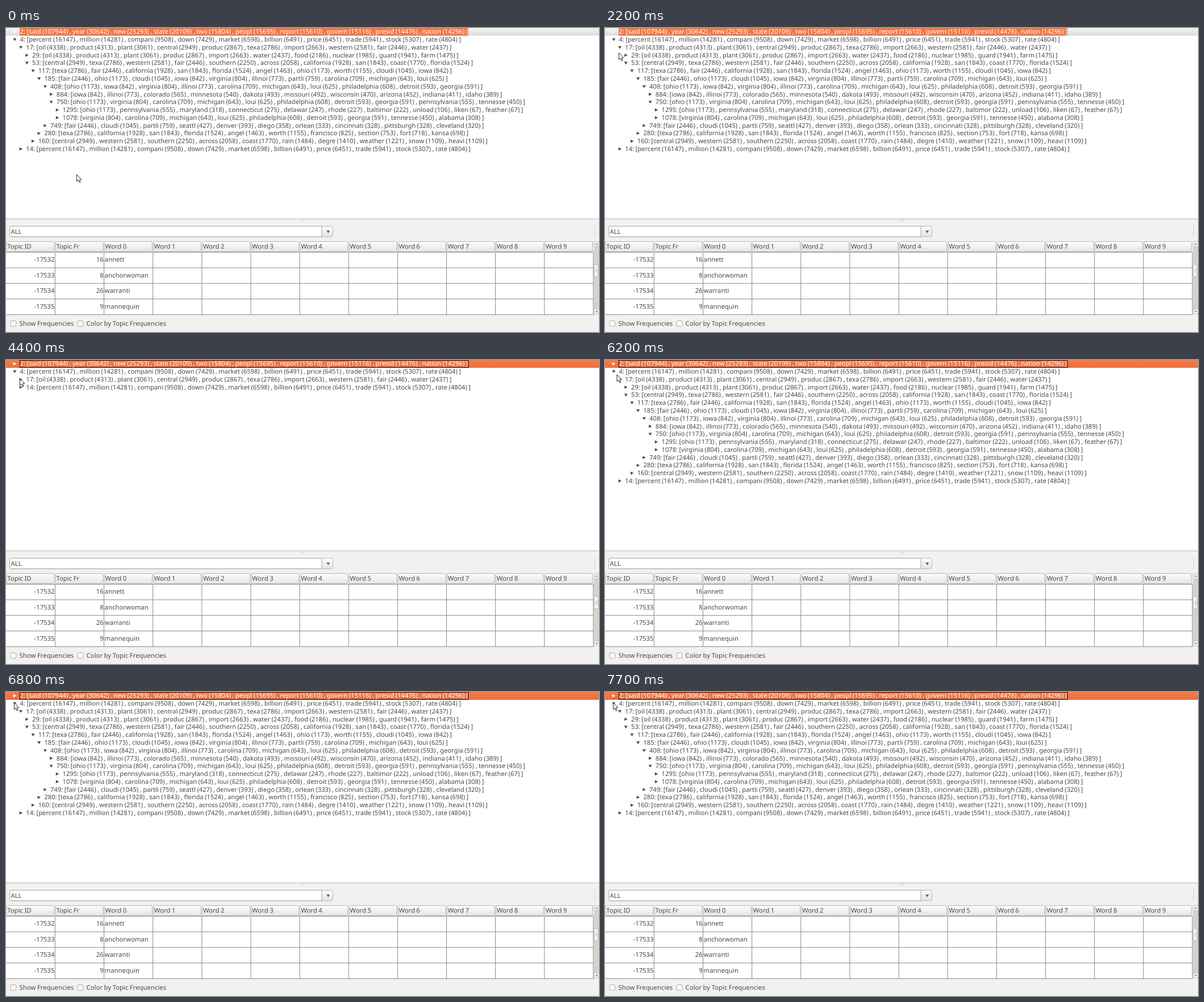
These frames come from a looping animation (1044 by 536 pixels, 8000 ms). An HTML page:

```html
<!DOCTYPE html>
<html lang="en">
<head>
<meta charset="utf-8">
<title>Topic tree</title>
<style>
  html, body { margin: 0; width: 100%; height: 100%; overflow: hidden; background: #f2f1f0; }
  svg { display: block; width: 100%; height: 100%; }
  text { font-family: "Noto Sans", "Open Sans", sans-serif; font-size: 11.35px; word-spacing: -0.45px; fill: #4a4a4a; text-rendering: geometricPrecision; }
  .tree text { font-size: 11.2px; }
  .tree .picked { fill: #fff; }
</style>
</head>
<body>
<svg id="stage" viewBox="0 0 1044 536" xmlns="http://www.w3.org/2000/svg">
  <defs>
    <linearGradient id="button" x2="0" y2="1">
      <stop stop-color="#fdfdfc"/><stop offset="1" stop-color="#e6e4e2"/>
    </linearGradient>
    <linearGradient id="idle" x2="0" y2="1">
      <stop stop-color="#f4f4f3"/><stop offset="1" stop-color="#dcdbda"/>
    </linearGradient>
    <linearGradient id="active" x2="0" y2="1">
      <stop stop-color="#f47d4c"/><stop offset="1" stop-color="#ec6c3b"/>
    </linearGradient>
    <linearGradient id="thumb">
      <stop stop-color="#fff"/><stop offset="1" stop-color="#e3e1df"/>
    </linearGradient>
  </defs>
</svg>
<script>
const NS = "http://www.w3.org/2000/svg";
const LOOP = 8000, STEP = 100;
const ROW = 13.77, INDENT = 10.7;
const LINE = "#8a8886", EDGE = "#b8b4b0";

// Each row: depth, open (-) or closed (+), id, then words; a count is given at its first use.
const TREE = `
0 + 2 said:107944 year:30642 new:25293 state:20109 two:15804 peopl:15695 report:15610 govern:15116 presid:14476 nation:14296
0 - 4 percent:16147 million:14281 compani:9508 down:7429 market:6598 billion:6491 price:6451 trade:5941 stock:5307 rate:4804
1 - 17 oil:4338 product:4313 plant:3061 central:2949 produc:2867 texa:2786 import:2663 western:2581 fair:2446 water:2437
2 + 29 oil product plant produc import water food:2186 nuclear:1985 guard:1941 farm:1475
2 - 53 central texa western fair southern:2250 across:2058 california:1928 san:1843 coast:1770 florida:1524
3 - 117 texa fair california san florida angel:1463 ohio:1173 worth:1155 cloudi:1045 iowa:842
4 - 185 fair ohio cloudi iowa virginia:804 illinoi:773 partli:759 carolina:709 michigan:643 loui:625
5 - 408 ohio iowa virginia illinoi carolina michigan loui philadelphia:608 detroit:593 georgia:591
6 + 884 iowa illinoi colorado:565 minnesota:540 dakota:493 missouri:492 wisconsin:470 arizona:452 indiana:411 idaho:389
6 - 750 ohio virginia carolina michigan loui philadelphia detroit georgia pennsylvania:555 tennesse:450
7 + 1295 ohio pennsylvania maryland:318 connecticut:275 delawar:247 rhode:227 baltimor:222 unload:106 liken:67 feather:67
7 + 1078 virginia carolina michigan loui philadelphia detroit georgia tennesse alabama:308
5 + 749 fair cloudi partli seattl:427 denver:393 diego:358 orlean:333 cincinnati:328 pittsburgh:328 cleveland:320
4 + 280 texa california san florida angel worth francisco:825 section:753 fort:718 kansa:698
3 + 160 central western southern across coast rain:1484 degre:1410 weather:1221 snow:1109 heavi:1109
1 + 14 percent million compani down market billion price trade stock rate`;

const counts = {};
const rows = TREE.trim().split("\n").map(line => {
  const [depth, mark, id, ...words] = line.split(" ");
  const items = words.map(entry => {
    const [word, count] = entry.split(":");
    if (count) counts[word] = count;
    return `${word} (${counts[word]})`;
  });
  return { depth: +depth, open: mark === "-", label: `${id}: [${items.join(" , ")} ]` };
});

function add(parent, tag, attrs = {}, content) {
  const node = document.createElementNS(NS, tag);
  for (const key in attrs) node.setAttribute(key, attrs[key]);
  if (content !== undefined) node.textContent = content;
  return parent.appendChild(node);
}
const box = (parent, x, y, width, height, fill, more = {}) =>
  add(parent, "rect", { x, y, width, height, fill, ...more });
const write = (parent, x, y, content, more = {}) => add(parent, "text", { x, y, ...more }, content);
const path = (parent, d, more = {}) => add(parent, "path", { d, ...more });
const show = (node, on) => node.setAttribute("display", on ? "inline" : "none");

const stage = document.getElementById("stage");

// Tree pane
box(stage, 0, 0, 1044, 336, "#fff");
const idleBar = add(stage, "g");
box(idleBar, 0, 0, 1044, 13.5, "url(#idle)");
box(idleBar, 24, 0, 790, 13.5, "#f07746");
const activeBar = add(stage, "g");
box(activeBar, 0, 0, 1044, 13.8, "url(#active)");
box(activeBar, 24.5, 0.5, 789.5, 12.6, "none", { stroke: "#2b1710", "stroke-width": 1.2 });

const tree = add(stage, "g", { class: "tree" });
const RIGHT = "M-2.5-2.8L3 0L-2.5 2.8Z", DOWN = "M-3-2.2H3L0 2.6Z";
rows.forEach((row, i) => {
  row.node = add(tree, "g");
  const x = row.depth * INDENT;
  row.arrow = path(row.node, RIGHT, {
    transform: `translate(${15.4 + x} 6.7)`, fill: i ? "#4a4a4a" : "#fff"
  });
  write(row.node, 24.6 + x, 10.4, row.label, i ? {} : { class: "picked" });
});

// Divider and filter box
box(stage, 0, 336, 1044, 1, "#bcb9b6");
for (let i = 0; i < 3; i++)
  path(stage, `M${519 + i * 2.4} 341l1.6-3`, { stroke: "#c3c0bd", "stroke-width": 0.8 });
box(stage, 6.5, 349.5, 569, 18.5, "url(#button)", { rx: 3, stroke: EDGE });
path(stage, "M556 349.5H9Q6.5 349.5 6.5 352V365.5Q6.5 368 9 368H556Z", { fill: "#fff", stroke: "#aaa6a2" });
path(stage, DOWN, { transform: "translate(567.3 359.3)", fill: "#666" });
path(stage, "M1034 349.5Q1036.5 349.5 1036.5 352V365.5Q1036.5 368 1034 368", { fill: "none", stroke: "#d0cdca" });
write(stage, 8.6, 362.5, "ALL");

// Table
const COL = 86.15, LEFT = i => i * COL + 0.5;
const heads = ["Topic ID", "Topic Fr", ...Array.from({ length: 10 }, (_, i) => `Word ${i}`)];
box(stage, 0, 395, 1034, 110, "#fff");
heads.forEach((head, i) => {
  box(stage, LEFT(i) + 0.4, 376.5, COL - 2, 18, "url(#button)", { rx: 2.5, stroke: EDGE });
  write(stage, LEFT(i) + 1.8, 389, head);
  box(stage, LEFT(i + 1) - 0.8, 395, 1, 110, LINE);
});
for (let i = 0; i < 5; i++) box(stage, 0, 394.8 + i * 27.5, 1034, 1, LINE);
[["16", "annett"], ["8", "anchorwoman"], ["26", "warranti"], ["9", "mannequin"]].forEach(([count, word], i) => {
  const y = 412 + i * 27.5;
  write(stage, 85.6, y, -17532 - i, { "text-anchor": "end" });
  write(stage, 171.8, y, count, { "text-anchor": "end" });
  write(stage, 173.6, y, word);
});

// Scrollbar
box(stage, 1035, 376, 9, 129, "#d5d2cf");
for (const [y, turn] of [[376.5, 180], [495.5, 0]]) {
  box(stage, 1035.5, y, 8.5, 9, "#f3f2f1", { rx: 2, stroke: "#c5c2bf" });
  path(stage, "M-2-1.2H2L0 1.5Z", { transform: `translate(1039.8 ${y + 4.5}) rotate(${turn})`, fill: "#777" });
}
box(stage, 1035.5, 416.5, 8, 22.5, "url(#thumb)", { rx: 3, stroke: "#aeaaa6" });
for (let i = 0; i < 3; i++) box(stage, 1037.5, 425 + i * 2.4, 4.5, 0.8, "#b0adaa");

// Check boxes
for (const [x, label] of [[8, "Show Frequencies"], [126, "Color by Topic Frequencies"]]) {
  box(stage, x + 0.2, 516.3, 9.6, 9.6, "#fcfcfb", { rx: 2, stroke: "#aaa7a3" });
  write(stage, x + 15.6, 525.2, label);
}

const cursor = path(stage, "M.5.8V12.8L3.2 10.4L5.2 15L7.1 14.2L5.2 9.7H8.8Z", {
  fill: "#fff", stroke: "#2a2a2a", "stroke-linejoin": "round"
});

// Pointer moves: start time, number of steps, destination
const moves = [
  [1100, 4, 35, 112], [1700, 6, 24, 43], [4400, 1, 24, 32],
  [6200, 2, 17, 18], [6500, 2, 15, 18], [6800, 1, 14, 18]
];
const ease = k => k * k * (3 - 2 * k);

function pointerAt(t) {
  let x = 124, y = 257.5;
  for (const [start, steps, toX, toY] of moves) {
    if (t < start) break;
    const k = ease(Math.min(1, (Math.floor((t - start) / STEP) + 1) / steps));
    x += (toX - x) * k;
    y += (toY - y) * k;
  }
  return [x, y];
}

function draw(t) {
  const focused = t >= 4400;
  const branchShut = t >= 4400 && t < 5300;
  const rootShut = t >= 6900 && t < 7700;
  show(idleBar, !focused);
  show(activeBar, focused);

  let line = 0;
  rows.forEach((row, i) => {
    const visible = row.depth <= (rootShut ? 0 : branchShut ? 1 : 9);
    show(row.node, visible);
    if (!visible) return;
    const open = row.open && !(rootShut && i === 1) && !(branchShut && i === 2);
    row.arrow.setAttribute("d", open ? DOWN : RIGHT);
    row.node.setAttribute("transform", `translate(0 ${line++ * ROW})`);
  });
  cursor.setAttribute("transform", `translate(${pointerAt(t).join(" ")})`);
}

const begin = performance.now();
function tick() {
  draw((performance.now() - begin) % LOOP);
  requestAnimationFrame(tick);
}
tick();
</script>
</body>
</html>
```
